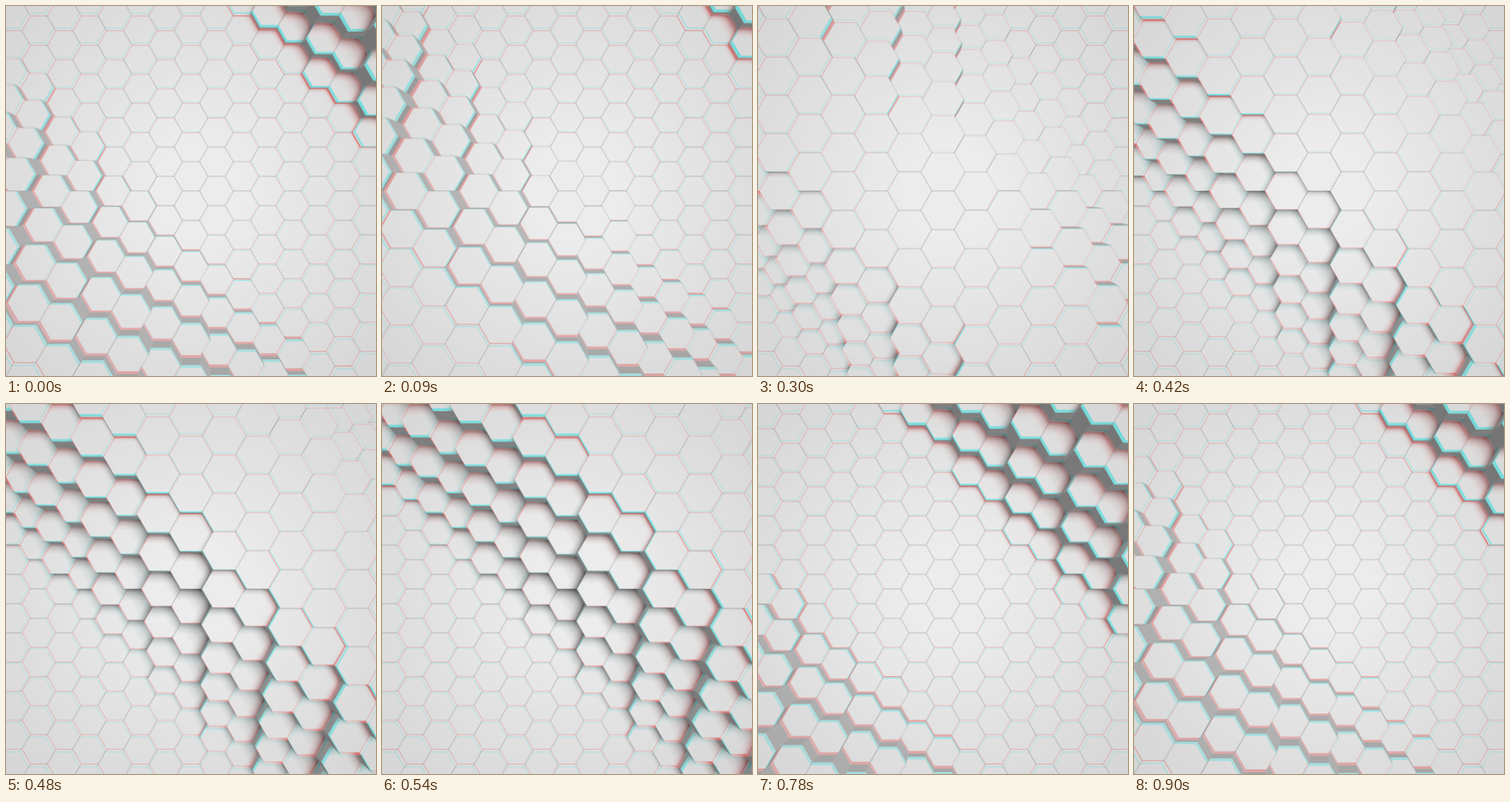
An HTML page with a canvas that plays this animation: 500x500 px, repeating every 0.93 s.

```html
<!DOCTYPE html>
<html lang="en">
<head>
<meta charset="utf-8">
<title>Hexagon wave</title>
<style>
  html, body { margin: 0; width: 100%; height: 100%; overflow: hidden; background: #e6e6e6; }
  canvas { display: block; width: 500px; height: 500px; }
</style>
</head>
<body>
<canvas id="stage" width="500" height="500"></canvas>
<script>
const SIZE = 500, PAD = 520, MID = PAD / 2;
const ROW = 39.7, COL = 34.5, SIDE = ROW / Math.sqrt(3);
const LOOP = 930, STEP = 30, PERIOD = 900;
const WAVE = 1060, CREST = 725, RAMP = 300, LIFT = 0.237, START = 295;
const FRINGE = 0.008;

const context = size => {
  const c = document.createElement('canvas');
  c.width = c.height = size;
  return c.getContext('2d');
};
const out = document.getElementById('stage').getContext('2d');
const scene = context(PAD);
const layer = context(SIZE);

// Edge k runs from corner k to corner k + 1, with its normal between them.
const corners = [], normals = [];
for (let k = 0; k < 6; k++) {
  const a = k * Math.PI / 3, b = a + Math.PI / 6;
  corners.push([Math.cos(a) * SIDE, Math.sin(a) * SIDE]);
  normals.push([Math.cos(b), Math.sin(b)]);
}

// The camera hangs over the middle, so outer cells are painted first.
const cells = [];
for (let i = -8; i <= 8; i++) {
  for (let j = -8; j <= 8; j++) {
    cells.push({ x: i * COL, y: j * ROW + (i % 2 ? 0 : ROW / 2) });
  }
}
cells.sort((a, b) => Math.hypot(b.x, b.y) - Math.hypot(a.x, a.y));

// Cells move in pairs: one in an odd column and its lower right neighbour.
function pairDepth(x, y) {
  const side = Math.round(x / COL) % 2 ? 0.5 : -0.5;
  return x + side * COL - (y + side * ROW / 2);
}

// Height from 0 to 1 of an eased wave that runs to the upper right.
function height(x, y, shift) {
  const u = (((pairDepth(x, y) - shift) % WAVE) + WAVE) % WAVE;
  const p = Math.max(0, Math.min(1, u / RAMP, (CREST - u) / RAMP));
  return (1 - Math.cos(Math.PI * p)) / 2;
}

const zoom = h => 1 / (1 - LIFT * h);
const project = (x, y, h) => [MID + x * zoom(h), MID + y * zoom(h)];

function trace(points) {
  scene.beginPath();
  points.forEach(([x, y]) => scene.lineTo(x, y));
  scene.closePath();
}

function drawWall({ x, y }, k, h, low) {
  const [nx, ny] = normals[k];
  const mx = x + nx * ROW / 2, my = y + ny * ROW / 2;
  if (mx * nx + my * ny >= 0) return;
  const a = corners[k], b = corners[(k + 1) % 6];
  const at = (c, z) => project(x + c[0], y + c[1], z);
  const tone = Math.round(157 + 30 * (nx - ny) * Math.SQRT1_2);
  trace([at(a, h), at(b, h), at(b, low), at(a, low)]);
  scene.fillStyle = scene.strokeStyle = `rgb(${tone},${tone},${tone})`;
  scene.fill();
  scene.lineWidth = 0.5;
  scene.stroke();
}

// Soft shadow cast by a taller neighbour on the upper right side.
function drawShade({ x, y }, k, h, rise) {
  const [nx, ny] = normals[k];
  if (nx - ny < 0) return;
  const power = 0.45 * Math.min(1, rise * 8);
  const reach = 3 + 70 * rise;
  const [gx, gy] = project(x + nx * ROW / 2, y + ny * ROW / 2, h);
  const g = scene.createLinearGradient(gx, gy, gx - nx * reach, gy - ny * reach);
  g.addColorStop(0, `rgba(0,0,0,${power})`);
  g.addColorStop(0.3, `rgba(0,0,0,${power * 0.42})`);
  g.addColorStop(0.65, `rgba(0,0,0,${power * 0.13})`);
  g.addColorStop(1, 'rgba(0,0,0,0)');
  scene.fillStyle = g;
  scene.fill();
}

function drawCell(cell, shift) {
  const { x, y } = cell;
  const h = height(x, y, shift);
  const around = normals.map(([nx, ny]) => height(x + nx * ROW * 1, y + ny * ROW, shift));
  around.forEach((n, k) => { if (n < h) drawWall(cell, k, h, n); });

  trace(corners.map(([cx, cy]) => project(x + cx, y + cy, h)));
  scene.fillStyle = '#ececec';
  scene.fill();
  around.forEach((n, k) => { if (n > h + 0.01) drawShade(cell, k, h, n - h); });
  scene.strokeStyle = 'rgba(0,0,0,0.18)';
  scene.lineWidth = 0.8;
  scene.stroke();
}

const vignette = scene.createRadialGradient(MID + 10, MID, 60, MID, MID, 370);
vignette.addColorStop(0, 'rgba(0,0,0,0)');
vignette.addColorStop(1, 'rgba(0,0,0,0.1)');

// Paints some colour channels of the scene at their own magnification.
function addChannel(color, scale, mode) {
  const w = PAD * scale, o = (SIZE - w) / 2;
  layer.globalCompositeOperation = 'copy';
  layer.drawImage(scene.canvas, o, o, w, w);
  layer.globalCompositeOperation = 'multiply';
  layer.fillStyle = color;
  layer.fillRect(0, 0, SIZE, SIZE);
  out.globalCompositeOperation = mode;
  out.drawImage(layer.canvas, 0, 0);
}

function draw(time) {
  const shift = START + WAVE * time / PERIOD;
  scene.fillStyle = '#e0e0e0';
  scene.fillRect(0, 0, PAD, PAD);
  scene.lineJoin = 'round';
  cells.forEach(cell => drawCell(cell, shift));
  scene.fillStyle = vignette;
  scene.fillRect(0, 0, PAD, PAD);
  addChannel('#f00', 1 + FRINGE, 'copy');
  addChannel('#0ff', 1 - FRINGE, 'lighter');
}

const begin = performance.now();
let last = -1;
function tick() {
  const time = Math.floor(((performance.now() - begin) % LOOP) / STEP) * STEP;
  if (time !== last) draw(last = time);
  requestAnimationFrame(tick);
}
tick();
</script>
</body>
</html>
```
